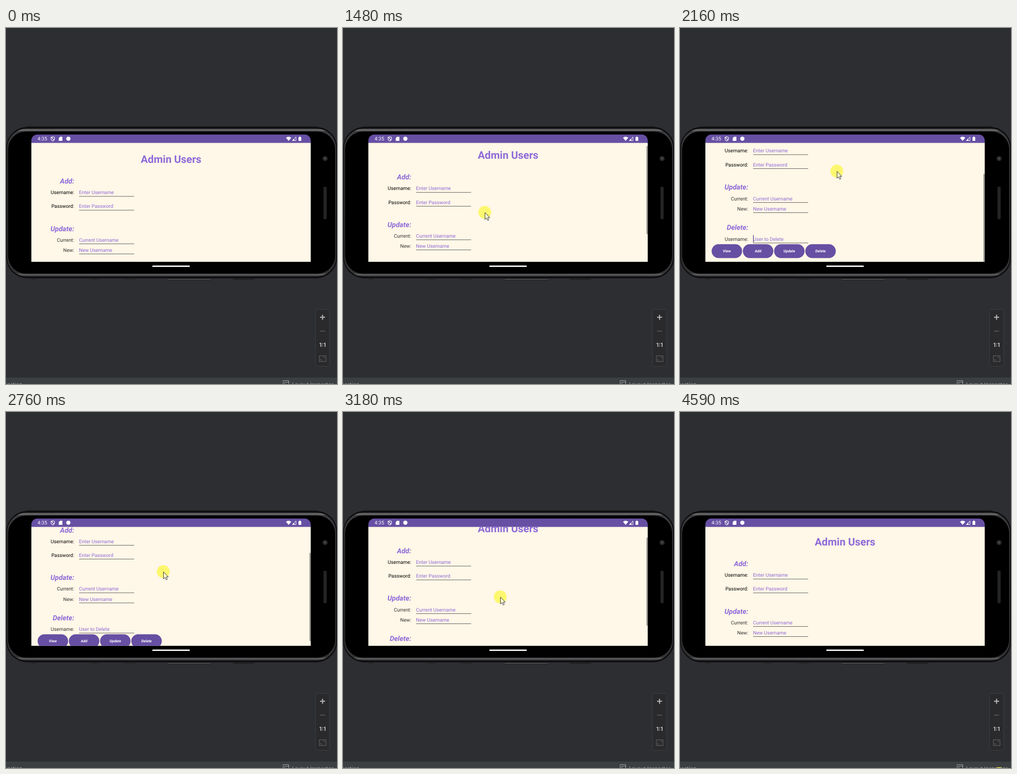
An HTML page for the animation above (4720 ms loop, 722 px wide and 776 px high).

```html
<!DOCTYPE html>
<html lang="en">
<head>
<meta charset="utf-8">
<title>Admin Users</title>
<style>
html, body { margin: 0; width: 100%; height: 100%; overflow: hidden; background: #2d2e32; }
svg { display: block; width: 722px; height: 776px; font-family: Roboto, sans-serif; text-rendering: geometricPrecision; }
.title { font: bold 22.9px Roboto, sans-serif; text-anchor: middle; fill: #8f6ad9; }
.head { font: italic bold 15.26px Roboto, sans-serif; text-anchor: end; fill: #8f6ad9; }
.label { font-size: 10.7px; text-anchor: end; }
.hint { font-size: 10.7px; fill: #8f6ad9; }
.button { font: italic bold 8.1px Roboto, sans-serif; text-anchor: middle; fill: #fff; }
.bar { font: 11.6px "Open Sans", sans-serif; fill: #b4b6b8; }
</style>
</head>
<body>
<svg viewBox="0 0 722 776">
  <defs>
    <linearGradient id="rim" x1="0" y1="0" x2="0" y2="1">
      <stop offset="0" stop-color="#2c2c2e"/>
      <stop offset=".01" stop-color="#707072"/>
      <stop offset=".022" stop-color="#3a3a3c"/>
      <stop offset=".975" stop-color="#333335"/>
      <stop offset=".987" stop-color="#5e5e60"/>
      <stop offset="1" stop-color="#262628"/>
    </linearGradient>
    <clipPath id="view"><rect x="55.3" y="250.5" width="609.4" height="259.2"/></clipPath>
  </defs>

  <!-- phone body -->
  <g>
    <path d="M45 214.5H680M55 547.5H67M182 547.5H200M258 547.5H282" stroke="#1c1c1e"/>
    <path d="M353 549.5H446" stroke="#101011"/>
    <path d="M353 548.5H446" stroke="#6c6c6c"/>
    <path d="M495 547.5H541" stroke="#1b1b1d" stroke-width="2"/>
    <rect x=".5" y="215.5" width="722" height="330" rx="46" fill="#0b0b0c" stroke="#222224"/>
    <rect x="2.5" y="219" width="717.5" height="323" rx="43" fill="url(#rim)"/>
    <rect x="4.5" y="225.5" width="713.5" height="310" rx="39"/>
    <circle cx="696" cy="284.5" r="5.5" fill="#29292a"/>
    <circle cx="696" cy="284.5" r="2" fill="#555"/>
    <rect x="692.5" y="346" width="7" height="71" rx="3" fill="#171717"/>
    <path d="M696 347V416" stroke="#3a3a3a" stroke-width="6.5" stroke-dasharray="1 1.5"/>
    <path d="M320.5 519.2H399.5" stroke="#fff" stroke-width="3" stroke-linecap="round"/>
  </g>

  <!-- screen -->
  <path d="M55.3 251V245A13 13 0 0 1 68 232.3H652A13 13 0 0 1 664.7 245V251Z" fill="#6750a4"/>
  <rect x="55.3" y="250.5" width="609.4" height="259.2" fill="#fff7e7"/>
  <g fill="#fff">
    <text x="68.8" y="245.3" font-size="10.9">4:35</text>
    <path d="M102 237L105.8 238.5V241.5Q105.5 245 102 246.3Q98.5 245 98.2 241.5V238.5ZM99 238L105 245" fill="none" stroke="#fff" stroke-width="1.2"/>
    <path d="M118 237H123V246H115V240Z"/>
    <circle cx="136" cy="241.3" r="4.6"/>
    <path d="M610.8 239.3Q616.5 234.5 622.2 239.3L616.5 246Z"/>
    <path d="M632.5 237.5V245.5H624.5Z" fill="none" stroke="#fff"/>
    <path d="M629 241V246H624Z"/>
    <path d="M638 238H639.7V236.8H642.3V238H644V246H638Z"/>
  </g>
  <g clip-path="url(#view)">
    <g id="page"><text class="title" x="360" y="293.5">Admin Users</text></g>
    <rect id="thumb" x="662" width="3" height="192" fill="#8f8d89"/>
  </g>

  <!-- zoom panel -->
  <g fill="none" stroke="#5c5e60">
    <rect x="675" y="613.5" width="31" height="124" rx="3" fill="#2a2a2c" stroke="#3e4042"/>
    <path d="M685 630.5H696M690.5 625V636" stroke="#c3c4c5" stroke-width="2"/>
    <path d="M685 660.7H696" stroke-width="1.6"/>
    <rect x="683.5" y="714.5" width="14.5" height="12.5" stroke-width="1.3"/>
    <path d="M686.5 721V724H690M692 717.5H695V720.5"/>
    <text x="690.5" y="694.5" font-size="12" font-family="Inter, sans-serif" font-weight="bold" text-anchor="middle" fill="#c3c4c5" stroke="none">1:1</text>
  </g>

  <!-- bottom bar -->
  <rect y="762" width="722" height="14" fill="#3c3f41"/>
  <path d="M604.5 780V768.5H616.5V780M608 780V772H618" fill="none" stroke="#a8aaac"/>
  <text class="bar" x="36" y="781" text-anchor="end">App Inspection</text>
  <text class="bar" x="624" y="781">Layout Inspector</text>

  <!-- pointer -->
  <g id="pointer">
    <circle id="press" r="14" fill="#fcf73c" fill-opacity=".7"/>
    <path d="M.5 .5V15.6L4 12.4L6.4 17.8L8.9 16.7L6.5 11.4H11Z" fill="#fff" fill-opacity=".65" stroke="#26262e"/>
  </g>
</svg>
<script>
const $ = id => document.getElementById(id);
const page = $("page"), thumb = $("thumb"), pointer = $("pointer"), press = $("press");

function add(tag, attrs, text = "") {
  const el = document.createElementNS("http://www.w3.org/2000/svg", tag);
  for (const name in attrs) el.setAttribute(name, attrs[name]);
  el.textContent = text;
  return page.appendChild(el);
}

function field(y, label, hint, lineY, ink) {
  add("text", { class: "label", x: 148.7, y, fill: ink }, label);
  add("text", { class: "hint", x: 159.3, y }, hint);
  add("rect", { x: 159.5, y: lineY, width: 120, height: 0.76, fill: "#25222b" });
}

const heading = (y, text) => add("text", { class: "head", x: 148.7, y }, text);

heading(339, "Add:");
field(362, "Username:", "Enter Username", 366.6, "#000");
field(392.3, "Password:", "Enter Password", 396.7, "#000");
heading(442.6, "Update:");
field(465.8, "Current:", "Current Username", 470.1, "#333");
field(488, "New:", "New Username", 492.1, "#333");
heading(530, "Delete:");
field(553.4, "Username:", "User to Delete", 557.9, "#333");
const caret = add("rect", { x: 159.5, y: 541.5, width: 1.5, height: 15.5, fill: "#5b4496" });
["View", "Add", "Update", "Delete"].forEach((name, i) => {
  const x = 69 + 68.1 * i;
  add("rect", { x, y: 560.8, width: 66.5, height: 30, rx: 15, fill: "#674fa3" });
  add("text", { class: "button", x: x + 33.2, y: 578.6 }, name);
});

// The screen updates in steps; all keys are [step, value...].
const LOOP = 4720, STEP = 67.6, LEAD = 17;
const path = [
  [5, 627, 662], [12, 451, 467], [14, 303, 400], [20, 303, 412], [21, 303, 412],
  [26, 334, 361], [29, 340, 319], [30, 341, 315], [32, 342, 312], [33, 342, 311],
  [34, 342, 311], [41, 343, 348], [42, 343, 355], [47, 343, 403], [50, 343, 421],
  [53, 343, 433], [58, 608, 516], [62, 710, 690], [65, 712, 778], [68, 695.5, 788]
];
const scrolls = [
  [21, 0], [26, 43.6], [29, 86], [30, 91.1], [34, 91.1],
  [41, 76.4], [42, 71], [47, 31.1], [50, 14], [53, 2.9]
];
const stretches = [[30, 1], [32, 1.007], [34, 1.007], [37, 1]];
const fades = [[58, 1], [63, 0]];

function at(keys, n) {
  const i = keys.findIndex(k => k[0] > n);
  if (i === 0) return keys[0].slice(1);
  if (i < 0) return keys[keys.length - 1].slice(1);
  const a = keys[i - 1], b = keys[i], f = (n - a[0]) / (b[0] - a[0]);
  return a.slice(1).map((v, j) => v + (b[j + 1] - v) * f);
}

const show = (el, on) => el.setAttribute("opacity", +on);

function draw(now) {
  const t = now % LOOP, n = Math.floor((t + LEAD) / STEP);
  const [x, y] = at(path, n), [scroll] = at(scrolls, n), [stretch] = at(stretches, n);
  page.setAttribute("transform", `translate(0 251) scale(1 ${stretch}) translate(0 ${-251 - scroll})`);
  thumb.setAttribute("y", 251 + scroll * 0.735);
  show(thumb, n < 22 ? 0 : at(fades, n)[0]);
  show(caret, n >= 30 && n < 37);
  pointer.setAttribute("transform", `translate(${x} ${y})`);
  show(pointer, t >= 310);
  show(press, n >= 20 && n <= 53 || n >= 68);
  requestAnimationFrame(draw);
}
requestAnimationFrame(draw);
</script>
</body>
</html>
```
